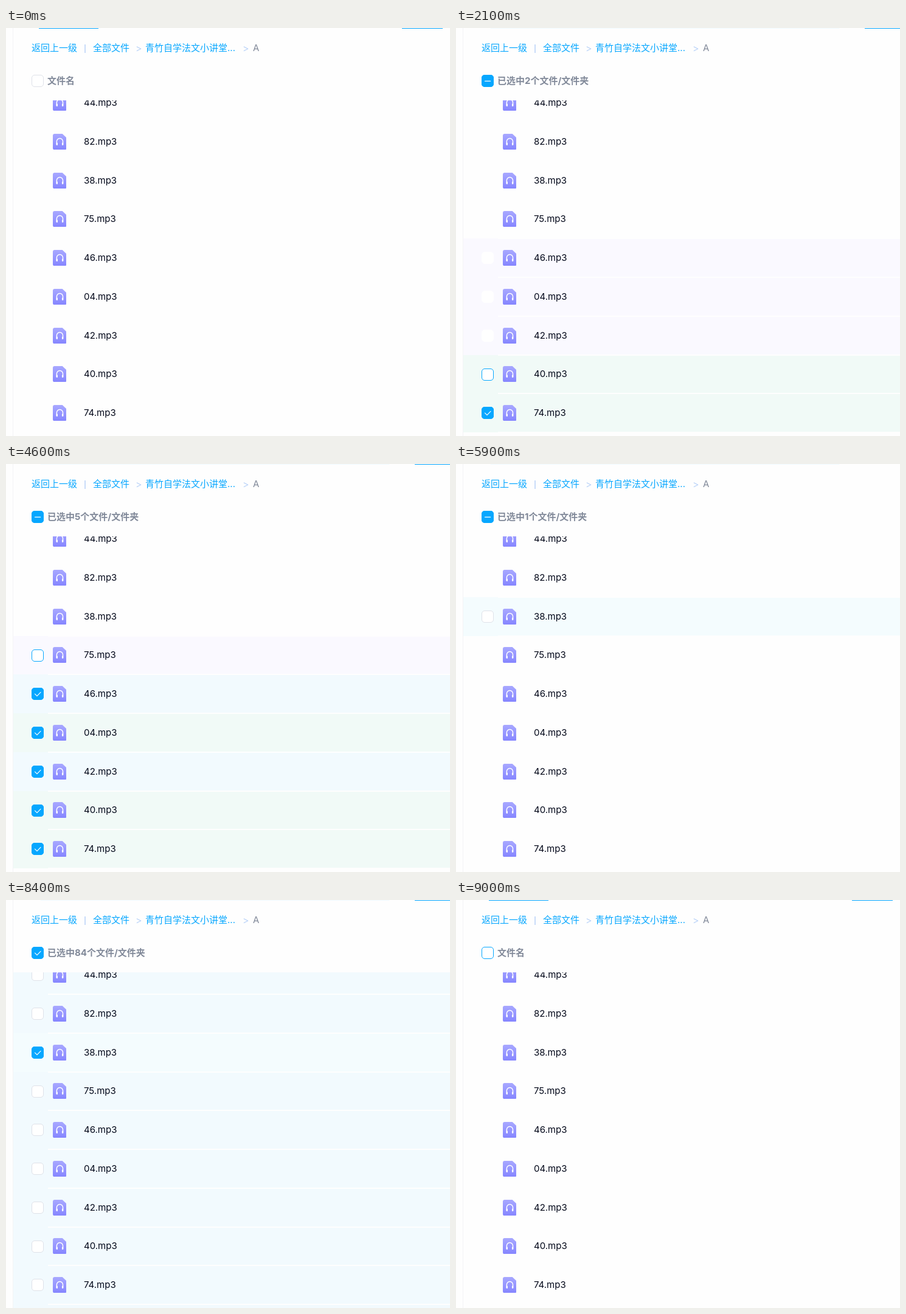
Write an HTML page that moves like this. It is 730 px wide and 671 px high and loops after 10000 ms.

```html
<!DOCTYPE html>
<html lang="zh-CN">
<head>
<meta charset="utf-8">
<title>文件列表</title>
<style>
  :root { --blue: #06a7ff; --paper: #fefefe; }
  html, body { margin: 0; width: 100%; height: 100%; overflow: hidden; background: var(--paper); }
  body { position: relative; font: 15px/40px Inter, "Noto Sans CJK SC", "Noto Sans CJK", sans-serif; color: #03081a; }
  body *, .row::before { position: absolute; box-sizing: border-box; white-space: nowrap; }
  .edge { left: 11px; top: 0; width: 1px; height: 100%; background: #f4f4f7; }
  .bar { top: 0; height: 1px; background: var(--blue); }
  .pale { background: #f0faff; }
  .path span { top: 13px; color: var(--blue); }
  .path .sep { font-size: 16px; color: #bcd4f8; }
  .path .rule { top: 27px; width: 2px; height: 14px; background: #c9dcf9; }
  .path .here { color: #818999; }
  .label { left: 68px; top: 67px; font-weight: 700; color: #818999; }
  .list { left: 12px; top: 119px; right: 0; bottom: 0; overflow: hidden; }
  .row { left: 0; right: 0; }
  .row::before { content: ""; left: 57px; right: 0; top: -1px; height: 2px; background: var(--paper); }
  .icon { left: 64.7px; top: 19px; width: 22.5px; height: 26.4px; }
  .name { left: 116px; top: 12px; }
  .box { left: 30px; top: 22px; width: 20px; height: 20px; border: 1px solid; border-radius: 5px; background: #fff; }
  .head { left: 42px; top: 77px; }
  .fill { inset: -1px; border-radius: 5px; background: var(--blue); }
  .fill svg { left: 0; top: 0; width: 20px; height: 20px; }
  .fill path { fill: none; stroke: #fff; stroke-width: 1.15; stroke-linecap: round; stroke-linejoin: round; }
</style>
</head>
<body>
<svg width="0" height="0">
  <defs>
    <linearGradient id="violet" x2="0" y2="1">
      <stop stop-color="#a8a8ff"/><stop offset="1" stop-color="#8585ff"/>
    </linearGradient>
    <symbol id="audio" viewBox="0 0 23 27">
      <path d="M3 0H16L23 6.5V24a3 3 0 0 1-3 3H3a3 3 0 0 1-3-3V3a3 3 0 0 1 3-3z" fill="url(#violet)"/>
      <path d="M6.5 18.5V12.8a5.2 5.2 0 0 1 10.4 0V18.5" fill="none" stroke="#fff" stroke-width="1.5"/>
      <path d="M5.8 15h2.3v4.3h-2.3zM15.3 15h2.3v4.3h-2.3z" fill="#fff"/>
    </symbol>
  </defs>
</svg>
<div class="edge"></div>
<div id="idle">
  <div class="bar" style="left:54px;width:98px"></div>
  <div class="bar" style="left:651px;width:67px"></div>
</div>
<div class="bar pale" id="tools" style="left:57px;width:573px"></div>
<div class="bar" id="many" style="left:672px;width:58px"></div>
<div class="path">
  <span style="left:42px">返回上一级</span>
  <i class="rule" style="left:129px"></i>
  <span style="left:143px">全部文件</span>
  <span class="sep" style="left:213px">&gt;</span>
  <span style="left:229px">青竹自学法文小讲堂...</span>
  <span class="sep" style="left:389px">&gt;</span>
  <span class="here" style="left:406px">A</span>
</div>
<div class="box head" id="head"></div>
<div class="label" id="label"></div>
<div class="list" id="list"></div>
<script>
const LOOP = 10000, STEP = 100, SELECT_ALL = 8400;
const BLUE = '#06a7ff', GREY = '#dfe2e9', HOVER = '#faf9ff';
const TICK = 'M5.5 10.2L9 13.6L15 7.3', DASH = 'M5.5 10.3H14.7';
const $ = id => document.getElementById(id);

// Row looks: - plain, g faded hover, h hover, b box hover, q selected, p pressed, 1-3 filling, c checked
const LOOKS = {
  '-': {},
  g: { hover: 1, edge: '#fff' },
  h: { hover: 1, edge: GREY },
  b: { hover: 1, edge: BLUE },
  q: { edge: GREY, fill: 0 },
  p: { edge: BLUE, fill: 0 },
  1: { edge: BLUE, fill: .3 },
  2: { edge: BLUE, fill: .6 },
  3: { edge: BLUE, fill: .85 },
  c: { edge: BLUE, fill: 1 }
};

const GREEN = '#f1faf7', SKY = '#f2fafe', CYAN = '#f4fcfe';
const ALL = ' 8400:q 8500:1 8600:2 8700:3 8800:c 8900:-';
const END = ' 5900:-' + ALL;
const FILES = [
  ['44', SKY, '7500:h 7600:-' + ALL],
  ['82', SKY, '100:h 200:- 7200:h 7500:-' + ALL],
  ['38', CYAN, '200:h 300:- 5200:h 5300:b 5400:h 5900:q 6000:2 6100:c 8900:-'],
  ['75', SKY, '300:h 400:- 4300:h 4600:b 4800:p 4900:2 5000:c' + END],
  ['46', SKY, '400:h 500:g 3800:h 4000:b 4100:p 4200:2 4300:c' + END],
  ['04', GREEN, '500:h 600:g 3100:h 3200:b 3400:p 3500:2 3600:c' + END],
  ['42', SKY, '600:h 700:g 2500:h 2600:b 2800:p 2900:2 3000:c' + END],
  ['40', GREEN, '1700:h 1900:b 2100:p 2200:2 2300:c' + END],
  ['74', GREEN, '700:h 1000:b 1400:p 1500:1 1600:2 1700:c' + END],
  ['', SKY, ALL.trim()]
];
const parse = text => ('0:- ' + text).split(' ').map(s => s.split(':'));
const COUNT = parse('1400:1 2100:2 2800:3 3400:4 4100:5 4800:6 5900:1 8400:84 8900:-');
const HEAD = parse('1400:q 1500:1 1600:2 1700:c 8900:1 9000:p');
const at = (track, t) => track.reduce((now, [start, value]) => t >= start ? value : now, '-');

function addMark(box) {
  box.innerHTML = `<div class="fill"><svg viewBox="0 0 20 20"><path d="${TICK}"/></svg></div>`;
}

function paintBox(box, look) {
  box.style.borderColor = look.edge || GREY;
  box.firstChild.style.opacity = look.fill || 0;
}

const mid = i => Math.round(123.25 + 63.75 * i);

const rows = FILES.map(([name, tint, track], i) => {
  const el = document.createElement('div');
  const shift = Math.round(123.2 + 63.75 * i) - mid(i);
  el.className = 'row';
  el.style.top = mid(i) - 32 - 119 + 'px';
  el.style.height = mid(i + 1) - mid(i) + 'px';
  el.innerHTML = '<div class="box"></div>' + (name &&
    `<svg class="icon" style="margin-top:${shift}px"><use href="#audio"/></svg>
     <span class="name" style="margin-top:${shift}px">${name}.mp3</span>`);
  $('list').append(el);
  const box = el.firstChild;
  addMark(box);
  return { el, box, tint, track: parse(track) };
});
addMark($('head'));

const show = (id, on) => { $(id).style.visibility = on ? 'visible' : 'hidden'; };

function draw(t) {
  for (const { el, box, tint, track } of rows) {
    const look = LOOKS[at(track, t)];
    const picked = t >= SELECT_ALL && tint === GREEN ? SKY : tint;
    el.style.background = look.hover ? HOVER : look.edge ? picked : 'none';
    box.style.visibility = look.edge ? 'visible' : 'hidden';
    paintBox(box, look);
  }
  const n = +at(COUNT, t) || 0;
  const text = n ? `已选中${n}个文件/文件夹` : '文件名';
  if ($('label').textContent !== text) $('label').textContent = text;
  paintBox($('head'), LOOKS[at(HEAD, t)]);
  $('head').querySelector('path').setAttribute('d', n && n < 84 ? DASH : TICK);
  show('idle', !n);
  show('tools', n);
  show('many', n > 1);
}

const begin = performance.now();
function frame() {
  const t = (performance.now() - begin) % LOOP;
  draw(Math.floor(t / STEP) * STEP);
  requestAnimationFrame(frame);
}
frame();
</script>
</body>
</html>
```
